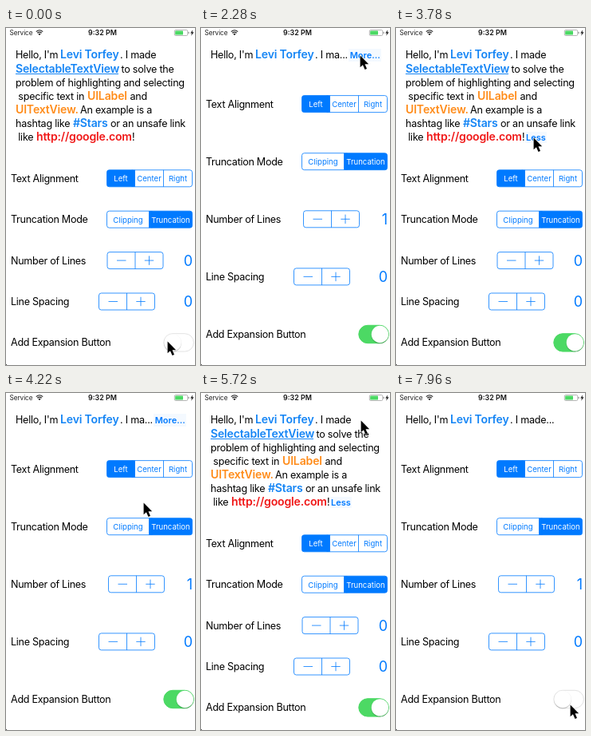
These frames come from a looping animation (237x422 px, 8000 ms). An HTML page:

```html
<!DOCTYPE html>
<html lang="en">
<head>
<meta charset="utf-8">
<title>Selectable text demo</title>
<style>
html, body { margin: 0; width: 100%; height: 100%; overflow: hidden; background: #fff; }
svg { display: block; width: 237px; height: 422px; font-family: Inter, Roboto, "Liberation Sans", sans-serif; cursor: default; }
.label { font-size: 12.6px; letter-spacing: -.3px; }
.copy { font-size: 12.6px; letter-spacing: -.24px; }
.link { font-size: 14.1px; font-weight: 600; letter-spacing: -.2px; }
.small { font-size: 11px; font-weight: 600; }
.seg { font-size: 9.6px; text-anchor: middle; }
.num { font-size: 18px; text-anchor: end; }
.bar { font-size: 8.3px; letter-spacing: -.1px; }
.time { font-size: 8.9px; font-weight: 600; text-anchor: middle; }
</style>
</head>
<body>
<svg id="stage" viewBox="0 0 237 422"></svg>
<script>
const BLUE = '#007aff', LINK = '#1585f5', ORANGE = '#ff8c1a', RED = '#f01818', GREEN = '#4cd964';
const NS = 'http://www.w3.org/2000/svg';
const stage = document.getElementById('stage');

function add(parent, tag, attrs, text) {
  const el = document.createElementNS(NS, tag);
  for (const key in attrs) el.setAttribute(key, attrs[key]);
  if (text !== undefined) el.textContent = text;
  return parent.appendChild(el);
}
const group = parent => add(parent, 'g', {});
const write = (parent, x, y, cls, text, fill = '#000') => add(parent, 'text', { x, y, class: cls, fill }, text);
const box = (parent, x, y, width, height, attrs) => add(parent, 'rect', { x, y, width, height, ...attrs });
const line = (parent, d, stroke = BLUE, w = .8) => add(parent, 'path', { d, stroke, 'stroke-width': w, fill: 'none' });
const show = (el, on) => el.setAttribute('visibility', on ? 'visible' : 'hidden');
const move = (el, x, y) => el.setAttribute('transform', `translate(${x} ${y})`);

// Status bar
write(stage, 4.5, 9, 'bar', 'Service', '#222');
line(stage, 'M37.8 4.6Q42 .9 46.2 4.6M39.3 6.3Q42 4 44.7 6.3', '#222', 1.2);
add(stage, 'path', { d: 'M40.4 7.4Q42 6.1 43.6 7.4L42 9.2Z', fill: '#222' });
write(stage, 121, 9, 'time', '9:32 PM', '#111');
box(stage, 211.3, 2.5, 16.5, 7, { rx: 1.5, fill: '#fff', stroke: '#999', 'stroke-width': .7 });
box(stage, 212.2, 3.4, 9.8, 5.2, { rx: .7, fill: GREEN });
box(stage, 228.4, 4.7, 1.2, 2.6, { rx: .6, fill: '#999' });
add(stage, 'path', { d: 'M234.2 2.2L231.2 6.5H233L232.2 9.8L235.6 5.3H233.6Z', fill: '#222' });

// Paragraph
const lineY = n => 38.4 + n * 17.15;
write(stage, 12, lineY(0), 'copy', "Hello, I'm");
write(stage, 68, lineY(0), 'link', 'Levi Torfey', LINK);

const full = group(stage);
[
  [0, 143, 'copy', '. I made'],
  [1, 12, 'link', 'SelectableTextView', LINK],
  [1, 144.5, 'copy', 'to solve the'],
  [2, 12, 'copy', 'problem of highlighting and selecting'],
  [3, 15.3, 'copy', 'specific text in'],
  [3, 102, 'link', 'UILabel', ORANGE],
  [3, 155.5, 'copy', 'and'],
  [4, 12, 'link', 'UITextView.', ORANGE],
  [4, 93, 'copy', 'An example is a'],
  [5, 12, 'copy', 'hashtag like'],
  [5, 84, 'link', '#Stars', LINK],
  [5, 131, 'copy', 'or an unsafe link'],
  [6, 15.3, 'copy', 'like'],
  [6, 38, 'link', 'http://google.com', RED],
  [6, 158, 'copy', '!']
].forEach(([n, x, cls, text, fill]) => write(full, x, lineY(n), cls, text, fill));
line(full, 'M12 57.5H141', LINK, 1);

const less = group(stage);
box(less, 162, 130, 27, 14, { fill: '#f4f9ff' });
write(less, 163, lineY(6), 'small', 'Less', BLUE);

const more = group(stage);
write(more, 143, lineY(0), 'copy', '. I ma...');
box(more, 185, 26, 41, 16, { fill: '#f4f9ff' });
write(more, 186.7, lineY(0), 'small', 'More...', BLUE);

const cut = group(stage);
write(cut, 143, lineY(0), 'copy', '. I made...');

// Settings rows, each drawn around y = 0
const rows = ['Text Alignment', 'Truncation Mode', 'Number of Lines', 'Line Spacing', 'Add Expansion Button'].map(name => {
  const row = group(stage);
  write(row, 6, 4.5, 'label', name);
  return row;
});

const outline = { rx: 3, fill: 'none', stroke: BLUE, 'stroke-width': .8 };

function segments(row, edges, names, active) {
  const last = edges.length - 1;
  const x = edges[active], w = edges[active + 1] - x;
  box(row, x, -10.5, w, 21, { rx: 2.5, fill: BLUE });
  box(row, active ? x : x + w - 4, -10.5, 4, 21, { fill: BLUE });
  box(row, edges[0], -10.5, edges[last] - edges[0], 21, outline);
  names.forEach((name, i) => {
    if (i) line(row, `M${edges[i]} -10.5V10.5`);
    write(row, (edges[i] + edges[i + 1]) / 2, 3.8, 'seg', name, i === active ? '#fff' : BLUE);
  });
}
segments(rows[0], [126.5, 161.5, 197.5, 233.5], ['Left', 'Center', 'Right'], 0);
segments(rows[1], [126.5, 179.5, 233.5], ['Clipping', 'Truncation'], 1);

function stepper(row) {
  const g = group(row);
  box(g, 0, -10.5, 70, 21, outline);
  line(g, 'M35 -10.5V10.5M12 0H23.5M46.8 0H58.2M52.5 -5.7V5.7');
  return g;
}
const lineStepper = stepper(rows[2]);
const lineCount = write(rows[2], 234, 6.5, 'num', '0', BLUE);
move(stepper(rows[3]), 116.5, 0);
write(rows[3], 234, 6.5, 'num', '0', BLUE);

const track = box(rows[4], 197.8, -11.2, 37.6, 22.4, { rx: 11.2 });
const knob = group(rows[4]);
add(knob, 'circle', { cy: 1.6, r: 10.6, fill: '#000', opacity: .1 });
add(knob, 'circle', { cy: .6, r: 11.1, fill: '#000', opacity: .1 });
add(knob, 'circle', { r: 10.7, fill: '#fff' });

box(stage, 0, 421, 1, 1, { fill: '#444' });
const pointer = add(stage, 'path', {
  d: 'M0 0V14.6L3.3 11.6L5.9 17.4L8.4 16.3L5.9 10.7H10.6Z',
  fill: '#000', stroke: '#fff', 'stroke-width': 1, 'stroke-linejoin': 'round', 'paint-order': 'stroke'
});

// time, pointer x, pointer y, text mode, switch position
const FULL = 0, MORE = 1, LESS = 2, CUT = 3;
const steps = [
  [0, 202, 392, FULL, 0],
  [500, 202, 392, FULL, .15],
  [650, 202, 392, MORE, .7],
  [800, 202, 386, MORE, 1],
  [940, 204, 340],
  [1090, 205, 250],
  [1240, 203, 140],
  [1390, 200, 62],
  [1530, 198, 36],
  [1830, 196, 30],
  [1980, 198, 34],
  [2280, 199, 34],
  [3030, 199, 33, LESS],
  [3330, 198, 37],
  [3480, 190, 76],
  [3630, 178, 120],
  [3780, 172, 137],
  [4220, 172, 137, MORE],
  [4520, 174, 128],
  [4670, 184, 85],
  [4820, 194, 40],
  [4970, 198, 23],
  [5120, 200, 34],
  [5720, 200, 34, LESS],
  [6020, 200, 37],
  [6170, 190, 92],
  [6320, 180, 210],
  [6470, 200, 329],
  [6770, 218, 378],
  [6920, 222, 389],
  [7060, 222, 390],
  [7210, 222, 390, CUT, .6],
  [7360, 222, 390, CUT, .1],
  [7510, 222, 390, CUT, 0],
  [7960, 218, 390]
];
steps.forEach((s, i) => {
  for (const k of [3, 4]) if (s[k] === undefined) s[k] = steps[i - 1][k];
});

const mix = (a, b, p) => Math.round(a + (b - a) * p);

function draw(now) {
  const t = now % 8000;
  const [, x, y, mode, on] = steps.findLast(s => s[0] <= t);
  const open = mode === FULL || mode === LESS;
  show(full, open);
  show(less, mode === LESS);
  show(more, mode === MORE);
  show(cut, mode === CUT);
  rows.forEach((row, i) => move(row, 0, open ? 188.3 + i * 51.4 : 95.1 + i * 72.1));
  move(lineStepper, open ? 127 : 128.5, 0);
  lineCount.textContent = open ? '0' : '1';
  const tint = `rgb(${mix(255, 76, on)},${mix(255, 217, on)},${mix(255, 100, on)})`;
  track.setAttribute('fill', tint);
  track.setAttribute('stroke', on > .3 ? tint : '#e2e2e2');
  move(knob, 209 + 15.4 * on, 0);
  move(pointer, x + .6, y + .6);
}
function tick(now) {
  draw(now);
  requestAnimationFrame(tick);
}
draw(0);
requestAnimationFrame(tick);
</script>
</body>
</html>
```
